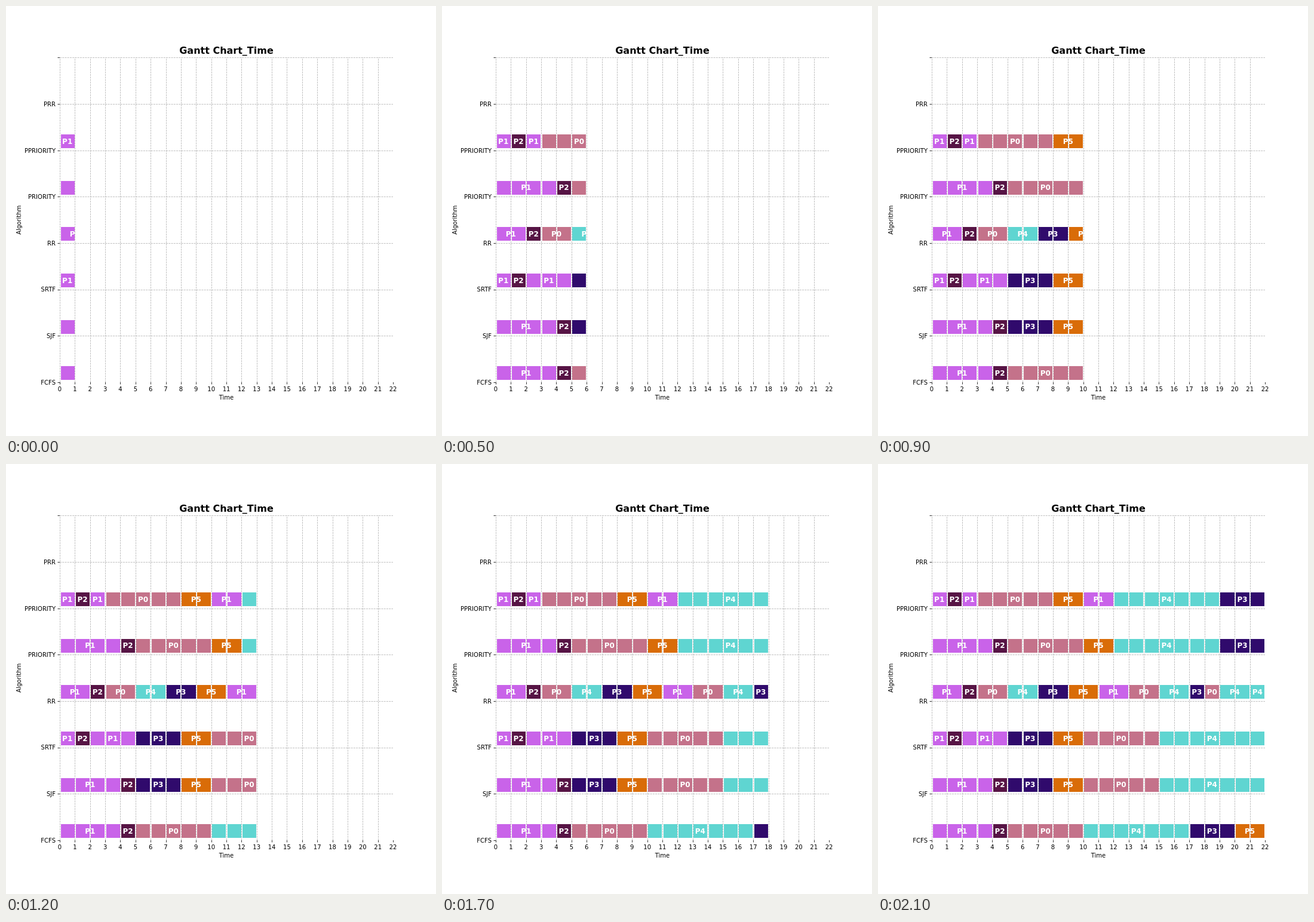
An HTML page for the animation above (2.2 s loop, 720 by 720 pixels).

```html
<!DOCTYPE html>
<html lang="en">
<head>
<meta charset="utf-8">
<title>Gantt Chart</title>
<style>
  html, body { margin: 0; width: 100%; height: 100%; overflow: hidden; background: #fff; }
  svg { display: block; width: 720px; height: 720px; }
  text { font: 10px "DejaVu Sans", sans-serif; text-anchor: middle; }
  .title { font-size: 16px; font-weight: bold; }
  .name { text-anchor: end; }
  .label { font-size: 12px; font-weight: bold; fill: #fff; }
  .grid { stroke: #b0b0b0; stroke-width: .8; stroke-dasharray: 2.96 1.28; }
  .tick { stroke: #000; stroke-width: .8; }
</style>
</head>
<body>
<svg id="chart" viewBox="0 0 720 720"></svg>
<script>
const LEFT = 90, RIGHT = 648, TOP = 86.4, BOTTOM = 630;
const UNITS = 22, ROWS = 7, STEP_MS = 100;
const COLORS = ["#c4728a", "#c963e9", "#571445", "#300a6c", "#5fd5d1", "#d96c08"];

// Each run is two digits: process number, then duration.
const SCHEDULES = [
  ["FCFS", "14 21 05 47 33 52"],
  ["SJF", "14 21 33 52 05 47"],
  ["SRTF", "11 21 13 33 52 05 47"],
  ["RR", "12 21 02 42 32 52 12 02 42 31 01 42 41"],
  ["PRIORITY", "14 21 05 52 47 33"],
  ["PPRIORITY", "11 21 11 05 52 12 47 33"],
  ["PRR", ""]
];

const svg = document.getElementById("chart");
const xAt = unit => LEFT + unit * (RIGHT - LEFT) / UNITS;
const yAt = row => BOTTOM - row * (BOTTOM - TOP) / ROWS;
const crisp = v => Math.round(v) + 0.5;

function add(tag, attrs, content = "") {
  const el = document.createElementNS("http://www.w3.org/2000/svg", tag);
  for (const key in attrs) el.setAttribute(key, attrs[key]);
  el.textContent = content;
  return svg.appendChild(el);
}
const line = (cls, x1, y1, x2, y2) => add("line", { class: cls, x1, y1, x2, y2 });
const text = (cls, x, y, content) => add("text", { class: cls, x, y }, content);

const cells = [];
const labels = [];

function addCell(row, unit, process) {
  const x = Math.round(xAt(unit + 0.06));
  const y = Math.round(yAt(row) - 26.7);
  const el = add("rect", {
    x, y,
    width: Math.round(xAt(unit + 0.97)) - x,
    height: Math.round(yAt(row) - 3.7) - y,
    fill: COLORS[process]
  });
  cells.push({ el, unit });
}

SCHEDULES.forEach(([, runs], row) => {
  let start = 0;
  for (const run of runs.split(" ").filter(Boolean)) {
    const process = +run[0], length = +run[1];
    for (let i = 0; i < length; i++) addCell(row, start + i, process);
    labels.push([xAt(start + length / 2), Math.round(yAt(row) - 11), "P" + process]);
    start += length;
  }
});

// Grid, ticks and axis text
for (let unit = 0; unit <= UNITS; unit++) {
  const x = crisp(xAt(unit));
  if (unit < UNITS) line("grid", x, BOTTOM, x, TOP);
  line("tick", x, BOTTOM, x, BOTTOM + 3.5);
  text("", xAt(unit), 645, unit);
}
for (let row = 0; row <= ROWS; row++) {
  const y = crisp(yAt(row));
  if (row > 0) line("grid", LEFT, y, RIGHT, y);
  line("tick", LEFT - 3.5, y, LEFT, y);
  if (row < ROWS) text("name", LEFT - 7, Math.round(yAt(row) + 3.8), SCHEDULES[row][0]);
}
text("title", 369, 80, "Gantt Chart_Time");
text("", 369, 659, "Time");
add("text", { transform: "translate(25 358.2) rotate(-90)" }, "Algorithm");

// White labels only become readable once bars lie beneath them.
for (const label of labels) text("label", ...label);

let shown = -1;
function draw(now) {
  const last = Math.floor(now / STEP_MS) % UNITS;
  if (last !== shown) {
    shown = last;
    for (const { el, unit } of cells) {
      el.setAttribute("visibility", unit <= last ? "visible" : "hidden");
    }
  }
}

const begin = performance.now();
function tick() {
  draw(performance.now() - begin);
  requestAnimationFrame(tick);
}
tick();
</script>
</body>
</html>
```
